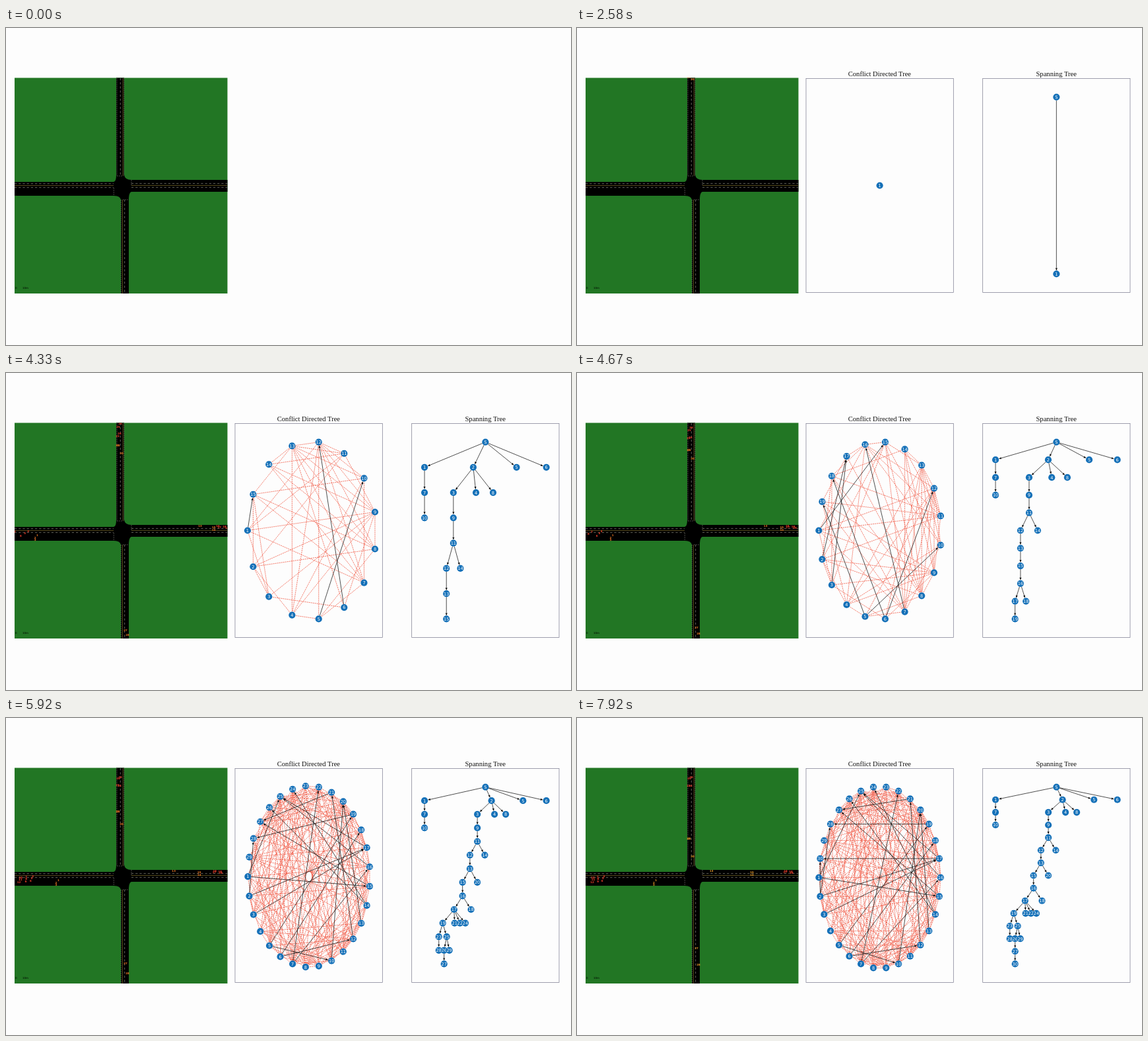
An HTML page for the animation above (8000 ms loop, 856 px wide and 480 px high).

```html
<!DOCTYPE html>
<html lang="en">
<head>
<meta charset="utf-8">
<title>Intersection conflict graph</title>
<style>
html, body { margin: 0; width: 100%; height: 100%; overflow: hidden; background: #fdfdfd; }
svg { display: block; width: 100vw; height: 100vh; }
.title { font: 10.6px "Liberation Serif", serif; text-anchor: middle; fill: #111; }
.label { font: 6.6px "DejaVu Sans", sans-serif; text-anchor: middle; fill: #fff; }
.car { font: bold 4px "DejaVu Sans", sans-serif; text-anchor: middle; }
.node { fill: #1470b8; }
.frame { fill: none; stroke: #77778c; stroke-width: .7; }
.arrow { stroke: #151515; stroke-width: .75; }
.head { fill: #0a0a0a; }
.dash { fill: none; stroke: #f0533e; stroke-width: .75; stroke-dasharray: 2.1 .95; }
.mark { fill: none; stroke: #8c8c80; stroke-width: .7; }
.gap { stroke-dasharray: 3.2 3; }
.solid { stroke: #7d6c2a; }
</style>
</head>
<body>
<svg viewBox="0 0 856 480">
  <defs><clipPath id="map"><rect x="13" y="75.5" width="322.5" height="326.5"/></clipPath></defs>
  <g clip-path="url(#map)">
    <rect x="13" y="75" width="323" height="328" fill="#227624"/>
    <path fill="#000" d="M167 75h12v150h-12zM13 233h152v21H13zM188 230h148v18H188zM174 256h12v147h-12z"/>
    <path fill="#000" d="M167 222H179Q180 230 190 230V248Q186 249 186 260H174Q173 254 163 254V233Q167 233 167 222Z"/>
    <path class="mark gap" d="M13 235.7H163M13 241.6H163M190 235.4H336M190 241.4H336M173.3 76V224M179.7 260V402"/>
    <path class="mark solid" d="M13 238.6H163M190 238.4H336M177.2 76V224M176.5 260V402"/>
    <path class="mark" stroke-dasharray="2 1" opacity=".7" d="M163.3 242V254M190 230V238M168 224H177M177 260H186M168 76V224M178.9 76V224M174.3 260V402"/>
    <text x="14" y="395" font-family="DejaVu Sans, sans-serif" font-size="4">0</text>
    <text x="25" y="395" font-family="DejaVu Sans, sans-serif" font-size="4">10m</text>
    <g id="cars" class="car"></g>
  </g>
  <g id="plots">
    <text class="title" x="458.4" y="73">Conflict Directed Tree</text>
    <text class="title" x="726.2" y="73">Spanning Tree</text>
    <rect class="frame" x="347" y="76.5" width="223.3" height="324"/>
    <rect class="frame" x="614.7" y="76.5" width="223.3" height="324"/>
    <g id="graph"></g>
    <g id="tree"></g>
  </g>
</svg>
<script>
const $ = id => document.getElementById(id);
const LOOP = 8000, FPS = 12, START = 31;

// Node count at a few steps, linear in between
const GROWTH = [[31, 1], [45, 11], [52, 15], [62, 25], [71, 29], [76, 30]];

const KIDS = {
  0: [1, 2, 5, 6], 1: [7], 7: [10], 2: [3, 4, 8], 3: [9], 9: [11], 11: [12, 14], 12: [13],
  13: [15, 20], 15: [16], 16: [17, 18], 17: [19, 21, 22, 24], 19: [23, 25], 23: [28],
  25: [26, 29], 26: [27], 27: [30]
};

// Vehicles that follow each other; every neighbouring pair is a solid arrow
const CHAINS = "1-15-27 5-10-20 6-12-21-27 3-17-30 2-17-25 7-16-25 6-18 5-19-28 13-20 7-22 14-24 14-26 1-25 2-28 2-30";
const DIRECTED = CHAINS.split(" ").flatMap(chain => {
  const ids = chain.split("-").map(Number);
  return ids.slice(1).map((id, i) => [ids[i], id]);
});

const DEPTH = [];
(function walk(i, d) {
  DEPTH[i] = d;
  (KIDS[i] || []).forEach(k => walk(k, d + 1));
})(0, 0);

const noise = (a, b) => {
  const v = Math.sin(a * 12.9898 + b * 78.233) * 43758.5453;
  return v - Math.floor(v);
};

// Vehicles on one tree level pass together; parent and child always conflict
function conflicts(a, b) {
  if (DEPTH[a] === DEPTH[b] || DIRECTED.some(e => e[0] === a && e[1] === b)) return false;
  return (KIDS[a] || []).includes(b) || noise(a, b) < .45;
}

function arrow([x1, y1], [x2, y2]) {
  const d = Math.hypot(x2 - x1, y2 - y1) || 1, ux = (x2 - x1) / d, uy = (y2 - y1) / d;
  const tx = x2 - ux * 5, ty = y2 - uy * 5, bx = tx - ux * 4, by = ty - uy * 4;
  return `<path class="arrow" d="M${x1 + ux * 5} ${y1 + uy * 5}L${bx} ${by}"/>` +
    `<path class="head" d="M${tx} ${ty}L${bx - uy * 1.5} ${by + ux * 1.5}L${bx + uy * 1.5} ${by - ux * 1.5}Z"/>`;
}

const node = ([x, y], name) =>
  `<circle class="node" cx="${x}" cy="${y}" r="5.1"/><text class="label" x="${x}" y="${y + 2.4}">${name}</text>`;

// Maps one axis to pixels: all values, then padded arrow ends, then a 5% margin
function fit(all, ends, from, size) {
  const lo = Math.min(...all), hi = Math.max(...all), w = hi - lo;
  if (w < 1e-6) return () => from + size / 2;
  let min = lo - w * .006, max = hi + w * .006;
  if (ends.length) {
    const a = Math.min(...ends), b = Math.max(...ends), pad = (b - a) * .05;
    min = Math.min(min, a - pad);
    max = Math.max(max, b + pad);
  }
  const m = (max - min) * .05;
  return v => from + (v - min + m) / (max - min + 2 * m) * size;
}

function drawGraph(n) {
  const unit = Array.from({ length: n }, (_, k) => {
    const a = Math.PI + 2 * Math.PI * k / n;
    return [Math.cos(a), -Math.sin(a)];
  });
  const used = DIRECTED.filter(e => e[1] <= n);
  const ends = used.flat().map(i => unit[i - 1]);
  const axis = (i, from, size) => fit(unit.map(p => p[i]), ends.map(p => p[i]), from, size);
  const fx = axis(0, 347, 223.3), fy = axis(1, 76.5, 324);
  const pos = unit.map(p => [fx(p[0]), fy(p[1])]);
  let lines = "";
  for (let b = 2; b <= n; b++)
    for (let a = 1; a < b; a++)
      if (conflicts(a, b)) lines += `M${pos[a - 1]}L${pos[b - 1]}`;
  $("graph").innerHTML = `<path class="dash" d="${lines}"/>` +
    used.map(([a, b]) => arrow(pos[a - 1], pos[b - 1])).join("") +
    pos.map((p, i) => node(p, i + 1)).join("");
}

// Each x is the mean of a leaf-based and a root-based position
function drawTree(n) {
  const kids = i => (KIDS[i] || []).filter(k => k <= n);
  const countLeaves = i => kids(i).length ? kids(i).reduce((s, k) => s + countLeaves(k), 0) : 1;
  const gap = 1 / countLeaves(0), pos = [];
  let leaf = 0;
  function place(i, mid, width) {
    const ks = kids(i), w = width / ks.length;
    const xs = ks.map((k, j) => place(k, mid - width / 2 + w * (j + .5), w));
    const x = ks.length ? (Math.min(...xs) + Math.max(...xs)) / 2 : leaf++ * gap;
    pos[i] = [(x + mid) / 2, DEPTH[i]];
    return x;
  }
  place(0, .5, 1);
  const xs = pos.map(p => p[0]), ys = pos.map(p => p[1]);
  const fx = fit(xs, xs, 614.7, 223.3), fy = fit(ys, ys, 76.5, 324);
  const at = pos.map(p => [fx(p[0]), fy(p[1])]);
  $("tree").innerHTML =
    at.map((p, i) => kids(i).map(k => arrow(p, at[k])).join("")).join("") +
    at.map((p, i) => node(p, i || "S")).join("");
}

// Per approach: leaders drive on steadily, followers close up to a slow queue
const ROADS = [
  { edge: 13, dir: 1, lanes: [246, 249.4, 252.6], enter: 31.5, speed: 1.68, lag: 0,
    queue: 9, queueLanes: [240, 243, 246.5], reach: 29 },
  { edge: 335, dir: -1, lanes: [231.4, 237.4, 234], enter: 32.5, speed: 2.1, lag: .45,
    queue: 4, queueLanes: [231.4, 234], reach: 20 },
  { edge: 76, dir: 1, vertical: true, lanes: [175, 170, 169], enter: 30, speed: 2.06, lag: .18,
    queue: 4, queueLanes: [169, 172], reach: 28 },
  { edge: 402, dir: -1, vertical: true, lanes: [181, 184], enter: 39, speed: .95, lag: .45,
    queue: 0, queueLanes: [], reach: 0 }
];

function drawCars(step) {
  let out = "", id = 0;
  const put = (road, lane, dist, fill) => {
    const along = road.edge + road.dir * dist, [x, y] = road.vertical ? [lane, along] : [along, lane];
    out += `<text x="${x}" y="${y + 1.4}" fill="${fill}">${++id}</text>`;
  };
  for (const r of ROADS) {
    r.lanes.forEach((lane, k) => {
      const late = k ? 1 : 0;
      put(r, lane, (step - r.enter - late * 2) * r.speed * (1 - r.lag * late), step > 76 ? "#ea9a28" : "#ee7a26");
    });
    for (let k = 0; k < r.queue; k++) {
      const n = r.queueLanes.length, row = Math.floor(k / n), rows = Math.ceil(r.queue / n);
      const slot = r.reach * (1 - row / (rows + .4)) - 4 * noise(k, r.edge);
      const age = step - 44 - 2.6 * k;
      put(r, r.queueLanes[k % n] + row, age < 0 ? -9 : slot * (1 - Math.exp(-age / 6)), "#f0402c");
    }
  }
  $("cars").innerHTML = out;
}

function nodeCount(step) {
  const i = Math.max(1, GROWTH.findIndex(([s]) => s > step));
  if (step >= GROWTH[GROWTH.length - 1][0]) return GROWTH[GROWTH.length - 1][1];
  const [[s0, n0], [s1, n1]] = [GROWTH[i - 1], GROWTH[i]];
  return Math.floor(n0 + (n1 - n0) * (step - s0) / (s1 - s0) + 1e-6);
}

let lastStep = -1, lastCount = 0;

function render(ms) {
  const step = Math.floor((ms % LOOP + 5) * FPS / 1000);
  if (step === lastStep) return;
  lastStep = step;
  const live = step >= START;
  $("plots").style.display = $("cars").style.display = live ? "" : "none";
  if (!live) return;
  drawCars(step);
  const n = nodeCount(step);
  if (n !== lastCount) {
    lastCount = n;
    drawGraph(n);
    drawTree(n);
  }
}

const begin = performance.now();
function loop() {
  render(performance.now() - begin);
  requestAnimationFrame(loop);
}
loop();
</script>
</body>
</html>
```
